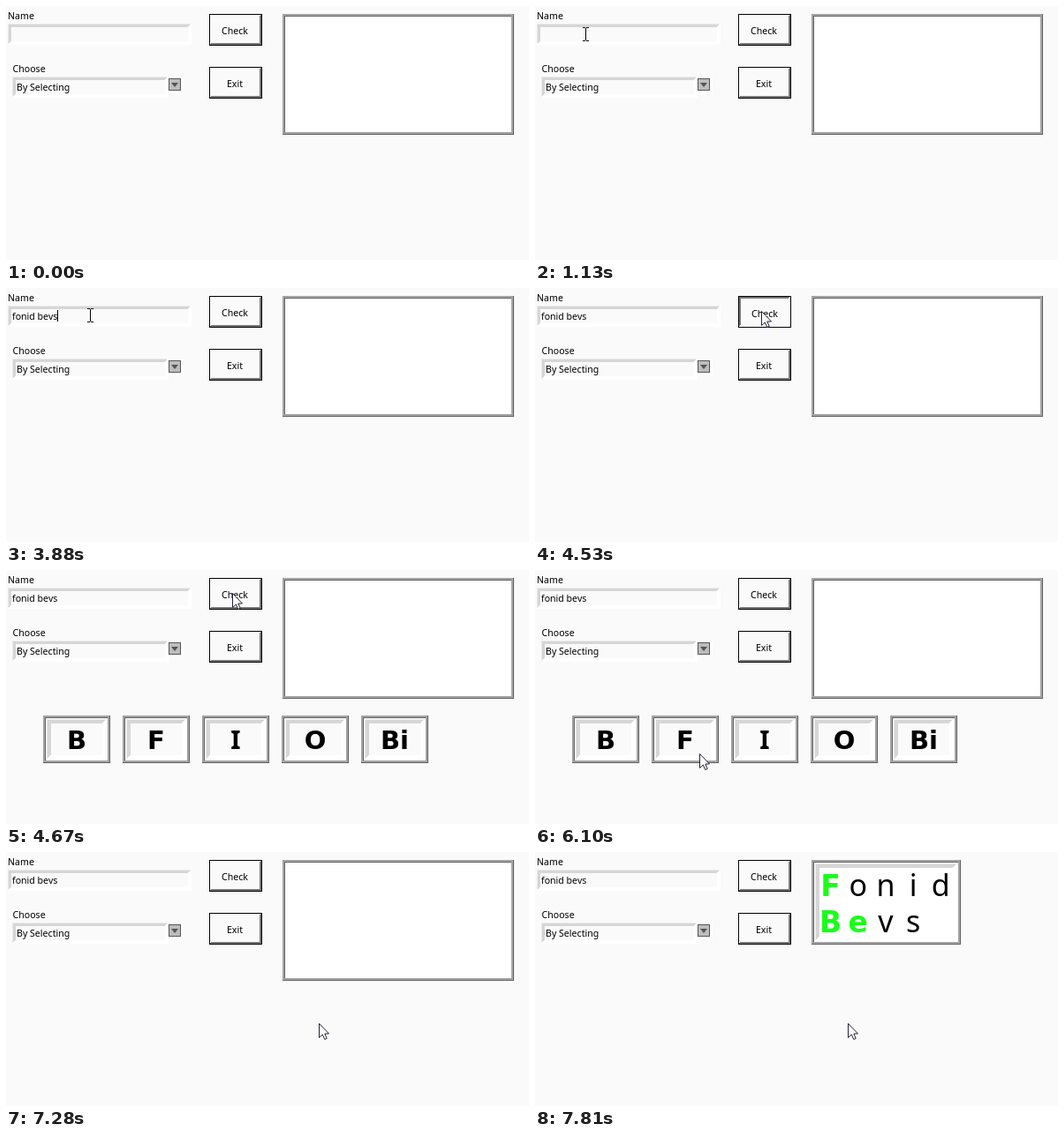
An HTML page with a canvas that plays this animation: 592x288 px, repeating every 8000 ms.

```html
<!DOCTYPE html>
<html lang="en">
<head>
<meta charset="utf-8">
<title>Name form</title>
<style>
  html, body { margin: 0; width: 100%; height: 100%; overflow: hidden; background: #fafafa; }
  canvas { display: block; }
</style>
</head>
<body>
<canvas id="stage" width="592" height="288"></canvas>
<script>
const ctx = document.getElementById('stage').getContext('2d');
const LOOP = 8000;
const FULL_NAME = 'Fonid Bevs';
const PAPER = '#fafafa';
const GREEN = '#19ff19';
const PLAIN = '"Noto Sans", "Open Sans", sans-serif';
const WIDE = '"DejaVu Sans", sans-serif';

// [start, number of typed letters]
const typing = [[0, 0], [2050, 2], [2310, 3], [2440, 4], [2570, 5], [2710, 6],
  [2840, 7], [2960, 8], [3100, 9], [3230, 10]];

// [start, x, y, shape]
const pointer = [
  [0], [880, 37, 36, beam], [1010, 48, 34, beam], [1130, 57, 32, beam],
  [3880, 95, 31, beam], [4020, 180, 42, arrow], [4130, 270, 40, arrow],
  [4270, 262, 31, arrow], [4400, 256, 26, arrow],
  [5580, 236, 80, arrow], [5700, 204, 138, arrow],
  [5840, 190, 185, arrow], [5970, 186, 211, arrow], [6100, 186, 208, arrow],
  [6230, 186, 204, arrow], [6620, 210, 203, arrow], [6750, 250, 199, arrow],
  [6880, 290, 195, arrow], [7020, 335, 195, arrow], [7150, 354, 194, arrow]
];

// [start, button captions]
const choices = [[0, ''], [4670, 'B F I O Bi'], [6230, 'B C K Be Bi'], [7280, '']];

const at = (steps, t) => steps.findLast(s => s[0] <= t);

function rect(x, y, w, h, color) {
  ctx.fillStyle = color;
  ctx.fillRect(x, y, w, h);
}

function text(s, x, y, { size = 10.6, weight = 400, align = 'left', color = '#000', face = PLAIN } = {}) {
  ctx.font = `${weight} ${size}px ${face}`;
  ctx.textAlign = align;
  ctx.fillStyle = color;
  ctx.fillText(s, x, y);
}

// Nested one-pixel rings, each [top-left colour, bottom-right colour]
function bevel(x, y, w, h, rings, fill) {
  for (const [light, dark] of rings) {
    rect(x, y, w, h, dark);
    rect(x, y, w - 1, 1, light);
    rect(x, y, 1, h - 1, light);
    x++; y++; w -= 2; h -= 2;
  }
  rect(x, y, w, h, fill);
}

function sunken(x, y, w, h, depth, fill) {
  const rings = Array.from({ length: depth }, (_, i) => [i ? '#d6d6d6' : '#ebebeb', '#fff']);
  bevel(x, y, w, h, rings, fill);
}

function panel(x, y, w, h) {
  bevel(x, y, w, h, [['#a0a0a0', '#606060'], ['#a8a8a8', '#a8a8a8'], ['#606060', '#a0a0a0']], '#fff');
}

function tile(x, y, w, h, fill) {
  panel(x, y, w, h);
  sunken(x + 4, y + 4, w - 8, h - 8, 5, fill);
}

function button(label, y, pressed) {
  const ring = pressed ? ['#777', '#fff'] : ['#fff', '#777'];
  const shift = pressed ? 1 : 0;
  bevel(230, y, 60, 36, [['#000', '#000'], ring, ring], PAPER);
  text(label, 259 + shift, y + 23 + shift, { align: 'center' });
}

function dropArrow() {
  rect(182, 80, 19, 19, '#fff');
  rect(184, 82, 14, 14, '#555');
  rect(185, 83, 12, 12, '#bdbdbd');
  ctx.fillStyle = '#555';
  ctx.beginPath();
  ctx.moveTo(187, 87);
  ctx.lineTo(195, 87);
  ctx.lineTo(191, 92);
  ctx.fill();
}

function beam(x, y) {
  rect(x, y - 7, 1, 14, '#000');
  for (const edge of [y - 8, y + 7]) {
    rect(x - 3, edge, 3, 1, '#000');
    rect(x + 1, edge, 3, 1, '#000');
  }
}

function arrow(x, y) {
  const shape = new Path2D('M.5 .5V16.5L4.3 13L6.8 18.5L9.2 17.4L6.8 12H11.5Z');
  ctx.save();
  ctx.translate(x, y);
  ctx.fillStyle = '#fff';
  ctx.fill(shape);
  ctx.strokeStyle = '#222238';
  ctx.stroke(shape);
  ctx.restore();
}

function result() {
  tile(313, 9, 169, 96, '#fff');
  const marked = [1, 2];
  const bold = { size: 33, weight: 700, align: 'center', color: GREEN, face: WIDE };
  const plain = { size: 34, align: 'center' };
  FULL_NAME.split(' ').forEach((word, row) =>
    [...word].forEach((letter, i) =>
      text(letter, 334.5 + i * 31.2, 50 + row * 41, i < marked[row] ? bold : plain)));
}

function choiceTile(caption, i) {
  const x = 42 + i * 90;
  tile(x, 165, 76, 54, PAPER);
  // The plain face has the capital I with serifs
  const face = caption === 'I' ? PLAIN : WIDE;
  text(caption, x + 38, 203, { size: 29, weight: 700, align: 'center', face });
}

function draw(t) {
  rect(0, 0, 592, 288, PAPER);

  text('Name', 2, 15);
  sunken(2, 20, 208, 24, 4, PAPER);
  const typed = FULL_NAME.toLowerCase().slice(0, at(typing, t)[1]);
  text(typed, 7, 36);
  if (t >= 2050 && t < 4530) {
    rect(Math.round(7 + ctx.measureText(typed).width), 25, 1, 13, '#000');
  }

  text('Choose', 7.5, 75);
  sunken(7, 80, 177, 24, 4, PAPER);
  text('By Selecting', 12, 96);
  dropArrow();

  button('Check', 9, t >= 4530 && t < 4670);
  button('Exit', 69);

  if (t < 7810) panel(313, 9, 262, 137);
  else result();

  const captions = at(choices, t)[1];
  if (captions) captions.split(' ').forEach(choiceTile);

  const [, x, y, shape] = at(pointer, t);
  if (shape) shape(x, y);
}

const start = performance.now();
function tick() {
  draw((performance.now() - start) % LOOP);
  requestAnimationFrame(tick);
}
tick();
</script>
</body>
</html>
```
